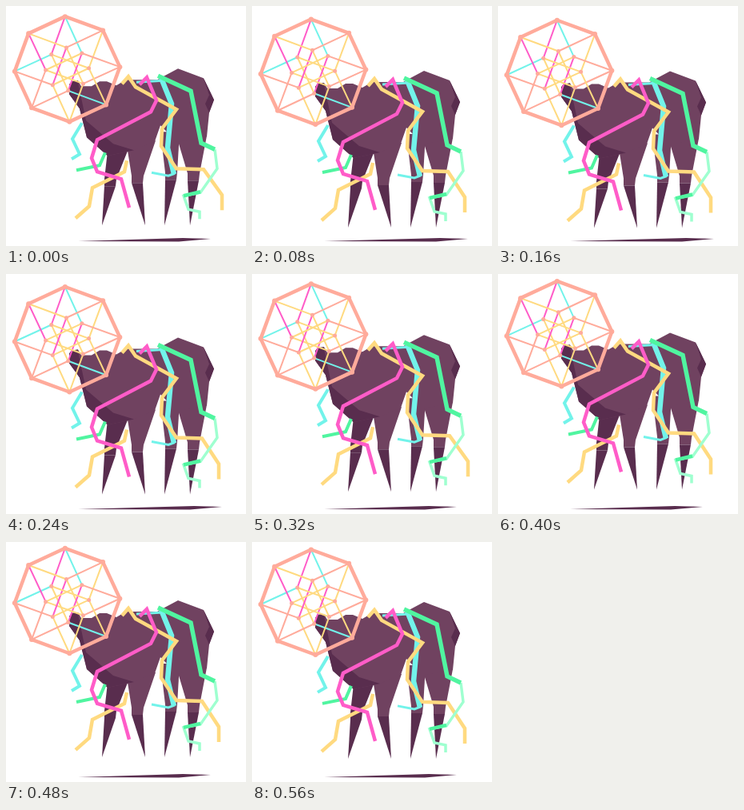
An HTML page with a canvas that plays this animation: 300x300 px, repeating every 0.64 s.

```html
<!DOCTYPE html>
<html lang="en">
<head>
<meta charset="utf-8">
<title>Walking creature</title>
<style>
html, body { margin: 0; width: 100%; height: 100%; overflow: hidden; background: #fff; }
canvas { display: block; width: 300px; height: 300px; }
</style>
</head>
<body>
<canvas id="stage" width="300" height="300"></canvas>
<script>
const ctx = document.getElementById('stage').getContext('2d');
const STEPS = 8, STEP_MS = 80;
const LIGHT = '#704260', DARK = '#592d4e', PEACH = '#ffab9b';
const PINK = '#ff5cc8', GREEN = '#50f5a0', MINT = '#9fffd0';
const CYAN = '#72f3ea', YELLOW = '#ffda80';

const wave = (step, peak, period = STEPS) => Math.cos((step - peak) / period * 2 * Math.PI);

function trace(points) {
  ctx.beginPath();
  points.forEach(([x, y]) => ctx.lineTo(x, y));
}
function fill(color, points) {
  trace(points);
  ctx.fillStyle = color;
  ctx.fill();
}
function stroke(color, width, points) {
  trace(points);
  ctx.strokeStyle = color;
  ctx.lineWidth = width;
  ctx.stroke();
}
function dot([x, y], radius) {
  ctx.beginPath();
  ctx.arc(x, y, radius, 0, 2 * Math.PI);
  ctx.fillStyle = PEACH;
  ctx.fill();
}

// A thigh narrowing to the knee, then a spike down to the foot
function drawLeg(left, right, hip, knee, kneeY, foot, thigh = LIGHT) {
  const ground = 277;
  fill(thigh, [[left, hip], [right, hip], [knee + 8, kneeY - 9], [knee + 7, kneeY], [knee - 7, kneeY], [knee - 7, kneeY - 9]]);
  fill(DARK, [[knee - 7, kneeY], [knee + 7, kneeY], [foot, ground]]);
}

function drawBody() {
  drawLeg(127, 152, 184, 130, 228, 120, DARK);
  drawLeg(150, 187, 171, 164, 224, 174);
  drawLeg(193, 217, 160, 206, 220, 198);
  drawLeg(213, 251, 165, 234, 221, 230);
  fill(LIGHT, [
    [79, 101], [82, 97], [90, 96], [94, 103], [107, 103], [117, 97], [126, 97],
    [138, 102], [150, 95], [189, 95], [200, 89], [215, 81], [247, 93], [260, 120],
    [254, 136], [251, 166], [214, 173], [193, 152], [186, 172], [160, 183],
    [127, 190], [101, 167], [92, 131], [79, 113]
  ]);
  // Shaded side of neck and chest
  fill(DARK, [
    [79, 101], [82, 97], [90, 96], [92, 108], [100, 146], [134, 175],
    [160, 183], [127, 190], [101, 167], [92, 131], [79, 113]
  ]);
  fill(DARK, [[247, 93], [260, 120], [254, 136], [249, 125], [254, 114]]);
}

function drawYarn(sway) {
  stroke(CYAN, 4, [[95, 149], [83, 169], [92, 188], [82, 194]]);
  stroke(GREEN, 4, [[124, 186], [117, 202], [88, 208]]);
  stroke(YELLOW, 4.5, [[151, 196], [148, 210], [108, 230], [104, 253], [87, 268]]);
  stroke(CYAN, 3, [[163, 98], [196, 96]]);
  stroke(CYAN, 3, [[211, 212], [203, 215], [182, 211]]);
  stroke(CYAN, 6.5, [[194, 93], [207, 125], [202, 180], [210, 213]]);
  stroke(YELLOW, 4.5, [
    [145, 100], [153, 91], [162, 104], [213, 132], [195, 156], [194, 178], [213, 206],
    [245 + sway / 2, 207], [266 + sway, 239], [266 + sway, 258]
  ]);
  stroke(MINT, 3.5, [[261, 182], [264, 206], [243, 236], [222, 240], [228, 257], [242, 260], [242, 269]]);
  stroke(GREEN, 4.5, [[243, 235], [222, 240]]);
  stroke(GREEN, 5.5, [[190, 90], [231, 109], [244, 174], [261, 182]]);
  stroke(PINK, 4.5, [
    [167, 101], [176, 92], [188, 121], [181, 135], [114, 170],
    [107, 193], [114, 210], [144, 219], [154, 255]
  ]);
}

// A hypercube seen as two concentric rings of eight corners
function drawCage(centerY) {
  const ring = radius => k => {
    const angle = (k * 45 - 92.4) * Math.PI / 180;
    return [76.6 + radius * Math.cos(angle), centerY + radius * Math.sin(angle)];
  };
  const outer = ring(65.8), inner = ring(27);
  const leftTints = [PINK, PEACH, YELLOW, PEACH], rightTints = [CYAN, YELLOW, PEACH];
  for (let k = 0; k < 8; k++) {
    stroke(leftTints[(k + 1) % 8 >> 1], 2, [outer(k), inner(k - 1)]);
    stroke(rightTints[k % 3], 2, [outer(k), inner(k + 1)]);
    stroke(k % 4 === 1 ? PINK : YELLOW, 2, [inner(k), inner(k + 3)]);
  }
  for (let k = 0; k < 8; k++) {
    stroke(PEACH, 4.5, [outer(k), outer(k + 1)]);
    dot(outer(k), 3);
    dot(inner(k), 2.5);
  }
}

function draw(step) {
  const lift = -3.8 + 4.4 * wave(step, 1.7);
  const cageY = 78.5 + 5 * wave(step, 1.9);
  const sway = 4 * Math.max(0, wave(step, 0, STEPS / 2));
  const shadowEnd = lift > -2 ? 270 : 256;

  ctx.clearRect(0, 0, 300, 300);
  fill(DARK, [[90, 294], [shadowEnd - 35, 290], [shadowEnd, 291], [shadowEnd - 40, 294.5]]);
  ctx.save();
  ctx.translate(0, lift);
  drawBody();
  drawYarn(sway);
  ctx.restore();
  drawCage(cageY);
}

function tick() {
  draw(Math.floor(performance.now() / STEP_MS) % STEPS);
  requestAnimationFrame(tick);
}
tick();
</script>
</body>
</html>
```
